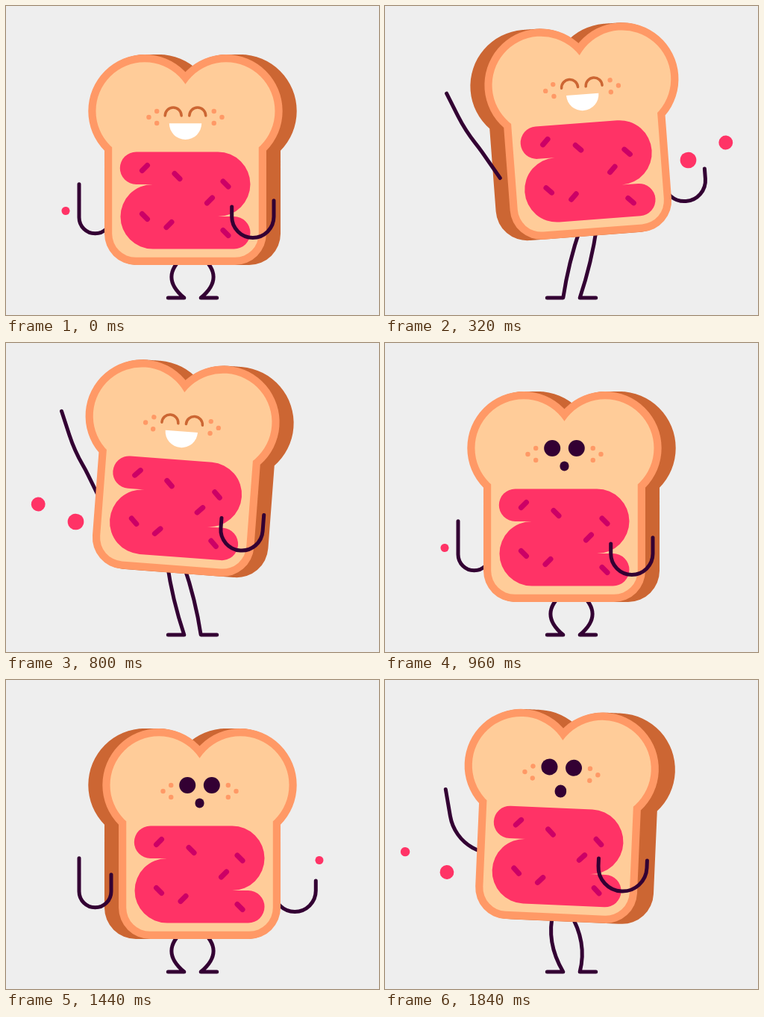
These frames come from a looping animation (500x414 px, 1.92 s). An HTML page with a canvas:

```html
<!DOCTYPE html>
<html>
<head>
<meta charset="utf-8">
<title>Dancing toast</title>
<style>
html, body { margin: 0; width: 100%; height: 100%; overflow: hidden; background: #eee; }
canvas { display: block; }
</style>
</head>
<body>
<canvas id="stage" width="500" height="414"></canvas>
<script>
const c = document.getElementById('stage').getContext('2d');
const INK = '#330033', CRUMB = '#ffcc99', CRUST = '#ff9966', SIDE = '#cc6633', JAM = '#ff3366', SEED = '#cc0066';
const TAU = Math.PI * 2, LOOP = 1920, BEAT = 960, STEP = 80;
const { sin, cos, abs, min, max, hypot, atan2, tan, acos } = Math;
c.lineCap = c.lineJoin = 'round';

// Slice outline around its bottom centre
function slice(inset) {
  const p = new Path2D(), r = 75.6 - inset, w = 108.5 - inset, corner = 42 - inset;
  for (const x of [-54.6, 54.6]) {
    p.moveTo(x + r, -206.3);
    p.arc(x, -206.3, r, 0, TAU);
  }
  p.roundRect(-w, -206.3, 2 * w, 206.3 - inset, [0, 0, corner, corner]);
  return p;
}
const outer = slice(0), inner = slice(10.2);
const jam = new Path2D(
  'M-66-151.5H43.7A43.3 43.3 0 0 1 43.7-64.9H65.3A21.7 21.7 0 0 1 65.3-21.5' +
  'H-43.7A43.3 43.3 0 0 1-43.7-108.1H-66A21.7 21.7 0 0 1-66-151.5Z');
// x, y, slant
const seeds = [[-54.5, -130, 1], [-11, -119, -1], [54, -108.5, -1], [32.5, -86.5, 1],
  [-54.5, -65, -1], [-22, -54, 1], [54, -43, -1]];

function dot(x, y, r, color) {
  c.fillStyle = color;
  c.beginPath();
  c.arc(x, y, r, 0, TAU);
  c.fill();
}

function pen(color, width) {
  c.strokeStyle = color;
  c.lineWidth = width;
}

// Limb through two rounded corners, from the origin to the hand
function limb(a, b, hand) {
  const pts = [[0, 0], a, b, hand];
  const seg = [0, 1, 2].map(i => [pts[i + 1][0] - pts[i][0], pts[i + 1][1] - pts[i][1]]);
  const len = seg.map(v => hypot(...v));
  const bend = ([x, y], [u, v]) => abs(tan(atan2(x * v - y * u, x * u + y * v) / 2)) + 1e-4;
  const t1 = bend(seg[0], seg[1]), t2 = bend(seg[1], seg[2]);
  const r = min(len[1] / (t1 + t2), len[0] / t1, len[2] / t2);
  c.beginPath();
  c.moveTo(0, 0);
  c.arcTo(...a, ...b, r);
  c.arcTo(...b, ...hand, r);
  c.lineTo(...hand);
  c.stroke();
}

function leftArm(up) {
  c.save();
  c.translate(-109, -86.3);
  pen(INK, 5);
  limb([-29 * up, 44 - 100 * up], [-43 + 1.5 * up, 44 - 128 * up],
    [-43 - 30 * up + 8 * up * up, -22 - 139 * up + 32 * up * up]);
  c.restore();
}

function rightArm(turn) {
  const k = max(0, 1 - turn * turn) ** 0.5, x = 65 * turn, low = 42.5 + 23.5 * k ** 1.7;
  c.save();
  c.translate(109, -86.3);
  pen(INK, 5);
  limb([0, low], [x, low], [x, 66 * k ** 3]);
  c.restore();
}

function legs(x, y, angle, sway) {
  const bulge = 34 * (1 - abs(sway));
  pen(INK, 5);
  for (const side of [-1, 1]) {
    const foot = 250 + side * 11.2;
    const px = x + side * 11 + 4 * sway;
    const py = y + side * 11 * sin(angle) - 12;
    c.beginPath();
    c.moveTo(foot + side * 21.5, 391);
    c.lineTo(foot, 391);
    c.quadraticCurveTo((foot + px) / 2 + side * bulge, (391 + py) / 2, px, py);
    c.stroke();
  }
}

function face(happy, up) {
  for (const s of [-1, 1])
    for (const [x, y] of [[38.3, -206], [49, -198], [38.3, -190]]) dot(s * x, y, 3.2, CRUST);
  if (happy) {
    pen(SIDE, 3.5);
    for (const x of [-16.3, 16.3]) {
      c.beginPath();
      c.arc(x, -200, 11, Math.PI, TAU);
      c.stroke();
    }
    c.fillStyle = '#fff';
    c.beginPath();
    c.arc(0, -189.7, 21.7, 0, Math.PI);
    c.fill();
  } else {
    for (const x of [-16.3, 16.3]) dot(x, -206, 11, INK);
    const w = min(15.5, 12 + 8 * up), h = 13 + 8 * up;
    c.fillStyle = INK;
    c.beginPath();
    c.roundRect(-w / 2, -182 + 8 * min(1, 2 * up) - h / 2, w, h, w / 2);
    c.fill();
  }
}

function drop(x, y, r, tail) {
  if (r <= 0) return;
  const l = r * (1 + 0.5 * tail), a = 2.42, open = acos(r / l);
  c.fillStyle = JAM;
  c.beginPath();
  c.arc(x, y, r, a + open, a - open + TAU);
  c.lineTo(x + l * cos(a), y + l * sin(a));
  c.fill();
}

// Two blobs thrown off sideways
function splash(phase, dir, fall) {
  const u = ((phase - 80 + BEAT) % BEAT - 80) / 320;
  if (u > 1) return;
  const tail = min(1, max(0, 1 - 3 * u));
  c.save();
  c.translate(250, fall);
  c.scale(dir, 1);
  drop(170 - 62 * (1 - u) ** 2.2, 200.5 - 61 * u + 190 * u * u - 88 * u ** 3, 11.2 - 5.7 * u ** 4, tail);
  drop(154.3 + 132 * u - 54 * u * u + 150 * min(0, u), 179.5 - 26 * u + 66 * u * u, 10.8 * (1 - u ** 3), tail);
  c.restore();
}

function drawSide(depth) {
  const side = new Path2D();
  for (let i = 0; i < 12; i++) side.addPath(outer, new DOMMatrix([1, 0, 0, 1, depth * (i / 6 - 1), 0]));
  c.fillStyle = SIDE;
  c.fill(side);
}

function draw(time) {
  const t = Math.floor(time % LOOP / STEP) * STEP, phase = t % BEAT;
  const sway = sin(TAU * phase / BEAT), up = abs(sway);
  const turn = sin(TAU * (phase - 160) / BEAT), depth = 11 * turn;
  const x = 250 + 22.5 * sway, y = 347 - 44 * up ** 0.9, angle = -5 * sway * Math.PI / 180;
  const facingLeft = turn < 1e-6;

  c.fillStyle = '#eee';
  c.fillRect(0, 0, 500, 414);
  legs(x, y, angle, sway);

  c.save();
  c.translate(x, y);
  c.rotate(angle);
  if (facingLeft) leftArm(up); else rightArm(turn);
  if (abs(depth) > 0.1) drawSide(depth);
  c.save();
  c.translate(depth, 0);
  c.fillStyle = CRUST;
  c.fill(outer);
  c.fillStyle = CRUMB;
  c.fill(inner);
  c.fillStyle = JAM;
  c.fill(jam);
  pen(SEED, 7);
  for (const [sx, sy, k] of seeds) {
    c.beginPath();
    c.moveTo(sx - 3.5, sy + 3.5 * k);
    c.lineTo(sx + 3.5, sy - 3.5 * k);
    c.stroke();
  }
  face(t < BEAT, up);
  c.restore();
  if (facingLeft) rightArm(turn); else leftArm(up);
  c.restore();

  splash(phase, 1, 0);
  splash((phase + BEAT / 2) % BEAT, -1, 33);
}

const start = performance.now();
function tick() {
  draw(performance.now() - start);
  requestAnimationFrame(tick);
}
tick();
</script>
</body>
</html>
```
